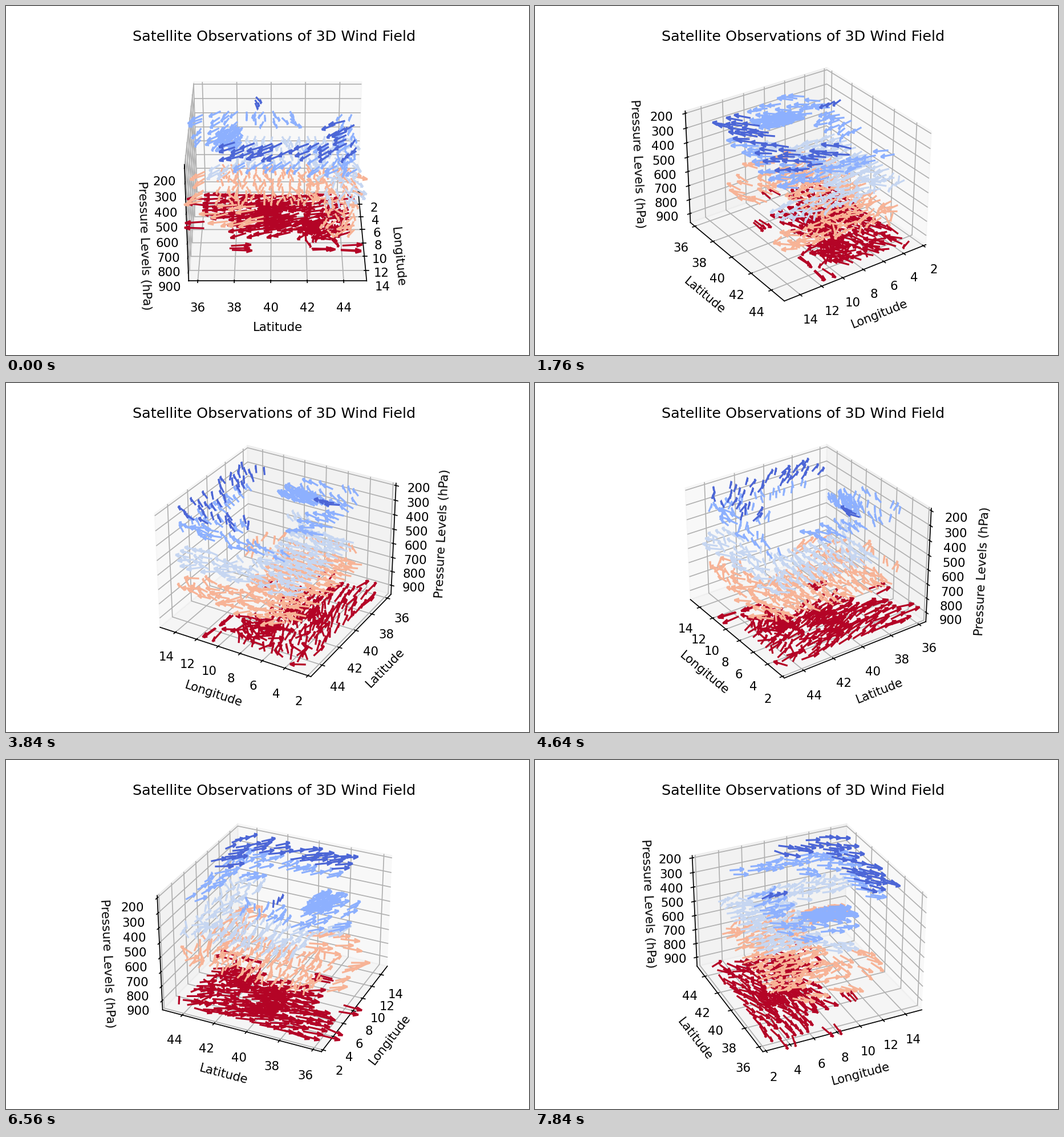
Recreate the animation shown at these times as a matplotlib script. Size 917x611 px, loop 8 s.

```python
import matplotlib.pyplot as plt
import numpy as np
from matplotlib.animation import FuncAnimation

FRAMES, INTERVAL = 50, 160
STEP_DEG = 5
Z_UNIT = 150  # hPa per plotted unit, opens the arrowheads vertically
rng = np.random.default_rng(4)

plt.rcParams["font.family"] = "DejaVu Sans"
fig = plt.figure(figsize=(6, 4), dpi=152.84)
ax = fig.add_subplot(projection="3d")
cmap = plt.get_cmap("coolwarm")

# observation grid; the row between the southern strip and the rest is empty
lon, lat = (a.ravel() for a in np.meshgrid(np.arange(2.8, 14.5, 0.6),
                                           np.arange(36.1, 44.7, 0.5)))
strip = lat < 36.5
main = lat > 37
north = lat > 42.9


def span(values, low, high):
    return (values > low) & (values < high)


def near(x, y, rx, ry):
    return np.hypot((lon - x) / rx, (lat - y) / ry) < 1


def draw(p, shade, x, y, heading):
    """Unit winds at one level; heading 0 is east, 90 north."""
    a = np.radians(heading)
    ax.quiver(x, y, np.full_like(x, p / Z_UNIT), np.cos(a), np.sin(a),
              np.zeros_like(x), length=1.15, normalize=True,
              color=cmap(shade), zorder=1)


def layer(p, shade, inside, heading, spread, keep):
    """Winds at the grid points of a region, slightly scattered."""
    pick = inside & (rng.random(lon.size) < keep)
    n = pick.sum()
    noise = rng.normal(0, 1, lon.size) * spread
    draw(p, shade, lon[pick] + rng.uniform(-0.12, 0.12, n),
         lat[pick] + rng.uniform(-0.04, 0.04, n), (heading + noise)[pick])


def cluster(p, shade, x, y, rx, ry, n, heading, spread):
    """Extra winds crowded round one point."""
    draw(p, shade, x + rng.uniform(-rx, rx, n), y + rng.uniform(-ry, ry, n),
         heading + rng.normal(0, spread, n))


# 950 hPa: northerlies over the west, whirling in the north-east
layer(950, 1.0, strip & (span(lon, 2.9, 5) | span(lon, 6.5, 9))
      | main & span(lon, 2.7, 7 + 2 * (lat > 38.5)),
      -88 + 5 * (lat - 36), 12 + 14 * (lat > 41.8), 0.85)
cluster(950, 1.0, 5.8, 40.7, 2, 0.8, 40, -72, 18)
cluster(950, 1.0, 8.4, 42.8, 1.5, 0.9, 40, -60, 70)
for y in (37.7, 42.4, 44):
    cluster(950, 1.0, 11.1, y, 0.4, 0.1, 3, 90, 6)

# 700 hPa: westerlies, turning south in the south-east
south_east = span(lon, 9.8, 12.8) & span(lat, 37, 39.7)
layer(700, 0.68, strip & span(lon, 3.8, 10)
      | main & span(lon, 3.2, 9.2 + 5 * north)
      | south_east & (rng.random(lon.size) < 0.4),
      3 - 70 * south_east - 38 * strip, 11 + 14 * north, 0.88)

# 500 hPa: westerlies
south = span(lat, 37, 37.8)
layer(500, 0.42, main & ~south & span(lon, 3.2, 8.2 + 6 * north)
      | south & span(lon, 7.8, 10),
      -30 * south, 8 + 14 * north, 0.88)

# 300 hPa: band along the south-west and another in the north
layer(300, 0.25, strip & span(lon, 4.2, 9.6)
      | main & span(lon, 3.8, 9.6 - 3.6 * (lat > 38.4)) & (lat < 41.3)
      | span(lon, 12.2, 13.6) & span(lat, 38.4, 41.8)
      | (lat > 42.4) & span(lon, 9 - 5 * (lat > 43.8), 14.2),
      -28 + 10 * (lat - 37) * (lon < 6.5) * (lat < 42) + 8 * north,
      8 + 8 * north, 0.72)
cluster(300, 0.25, 8.2, 37.9, 1.5, 0.55, 45, -22, 9)

# 200 hPa: eastern band and one spot in the west
layer(200, 0.06, near(4.7, 38.9, 1, 0.5)
      | span(lon, 11.3 - 3.2 * (lat > 43.4), 13.7) & (lat > 37.8),
      10 - 60 * (lon > 8) + 4 * (lat - 38), 9, 0.6)

ax.set_xticks(range(2, 15, 2))
ax.set_yticks(range(36, 45, 2))
levels = np.arange(200, 901, 100)
ax.set_zticks(levels / Z_UNIT, [str(p) for p in levels])
ax.set_xlim(1.74, 15.46)
ax.set_ylim(35.5, 45.26)
ax.set_zlim(965.6 / Z_UNIT, 184.4 / Z_UNIT)
ax.set_xlabel("Longitude")
ax.set_ylabel("Latitude")
ax.set_zlabel("Pressure Levels (hPa)")
ax.set_title("Satellite Observations of 3D Wind Field")
# keep the levels stacked in drawing order from every side
ax.computed_zorder = False


def update(i):
    ax.view_init(elev=30, azim=STEP_DEG * i)
    return []


anim = FuncAnimation(fig, update, frames=FRAMES, interval=INTERVAL,
                     repeat=True, repeat_delay=0, blit=False)
plt.show()
```
